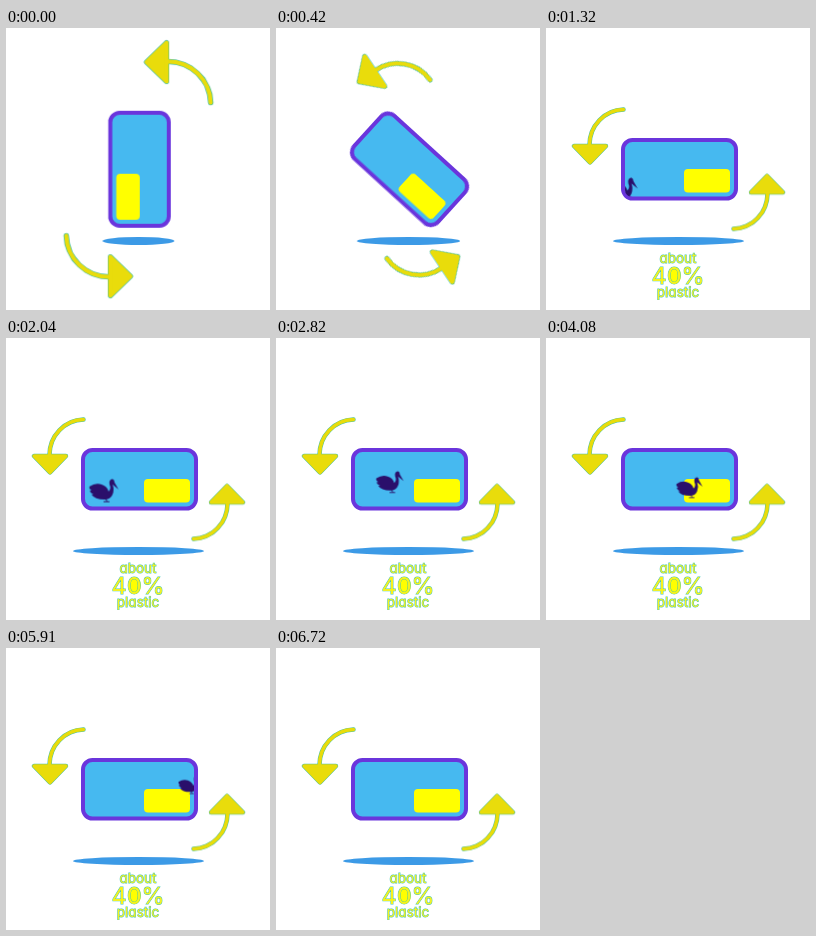
These frames come from a looping animation (264x282 px, 8000 ms). An HTML page:

```html
<!DOCTYPE html>
<html lang="en">
<head>
<meta charset="utf-8">
<title>Turning card</title>
<style>
  html, body { margin: 0; width: 100%; height: 100%; overflow: hidden; background: #fff; }
  svg { display: block; width: 264px; height: 282px; }

  .card, .shadow, .arrows, .bird, .label { animation: 8s linear infinite; }

  .card { transform-origin: 133.5px 141.3px; animation-name: turn; }
  .shadow { transform-origin: 132.5px 213px; animation-name: widen; }
  .arrows { transform-origin: 132.5px 141.2px; animation-name: orbit; }
  .bird { animation-name: stroll; }
  .label { animation-name: appear; }

  /* One step every 30 ms: card 150-660 ms, arrows 150-870 ms */
  @keyframes turn {
    0% { transform: rotate(90deg); }
    1.875% { transform: rotate(90deg); animation-timing-function: steps(17); }
    8.25%, 100% { transform: rotate(0deg); }
  }
  @keyframes widen {
    0% { transform: scaleX(.55); }
    1.875% { transform: scaleX(.55); animation-timing-function: steps(17); }
    8.25%, 100% { transform: scaleX(1); }
  }
  @keyframes orbit {
    0% { transform: rotate(90deg) scale(1.21); }
    1.875% { transform: rotate(90deg) scale(1.21); animation-timing-function: steps(24); }
    10.875%, 100% { transform: rotate(0deg) scale(1); }
  }
  @keyframes appear {
    0%, 12% { opacity: 0; }
    15.75%, 100% { opacity: 1; }
  }
  @keyframes stroll {
    0%, 10.875% { transform: translate(61px, 166px) scale(1.04); }
    12% { transform: translate(64.5px, 165px) scale(1.04); }
    22.5% { transform: translate(91.5px, 157px) scale(1.01); }
    25.5% { transform: translate(97.5px, 152.5px) scale(1); }
    32.25% { transform: translate(109px, 146px) scale(.97); }
    35.25% { transform: translate(113.5px, 144px) scale(.94); }
    42.375% { transform: translate(127px, 145px) scale(.92); }
    51% { transform: translate(143px, 149.5px) scale(.9); }
    56.625% { transform: translate(153px, 150.5px) scale(.87); }
    62.625% { transform: translate(163px, 147.5px) scale(.84); }
    65.625% { transform: translate(168.5px, 144.5px) scale(.8); }
    72.75% { transform: translate(181.5px, 138px) scale(.78); }
    84%, 100% { transform: translate(199.5px, 127px) scale(.75); }
  }

  .label text {
    font: 13.5px Inter, "Open Sans", sans-serif;
    font-feature-settings: "cv11";
    text-anchor: middle;
    fill: #f6f21c;
    stroke: #3fc4b4;
    stroke-width: .9px;
    paint-order: stroke;
  }
  .label .big { font-size: 23.5px; }
</style>
</head>
<body>
<svg viewBox="0 0 264 282">
  <defs>
    <clipPath id="inside"><rect x="79" y="114" width="109" height="55" rx="7"/></clipPath>
    <path id="arc" d="M43.5 117A35 35.5 0 0 1 77.5 81.5" fill="none" stroke-linecap="round"/>
    <path id="head" d="M28 118H60L44 134.5Z" stroke-linejoin="round"/>
    <g id="arrow">
      <g stroke="#43bfa6">
        <use href="#arc" stroke-width="4.4"/>
        <use href="#head" stroke-width="4.4"/>
      </g>
      <g stroke="#e9dc0b" fill="#e9dc0b">
        <use href="#arc" stroke-width="3.4"/>
        <use href="#head" stroke-width="3.4"/>
      </g>
    </g>
  </defs>

  <ellipse class="shadow" cx="132.5" cy="213" rx="65.5" ry="4" fill="#3c9ae6"/>

  <g class="card">
    <rect x="77" y="112" width="113" height="58.5" rx="9.5" fill="#46b9f0" stroke="#6a35dc" stroke-width="4"/>
    <rect x="138" y="141" width="46" height="23.5" rx="4" fill="#ff0"/>
  </g>

  <g clip-path="url(#inside)">
    <g class="bird" fill="#2a0f6b">
      <path d="M-14-4Q-8-8-2-6Q4-4 5 1Q8-2 6-6Q5-11 9-11.5Q11-11 11-8L15-1 9-6Q11-1 9 4Q7 9 1 9Q-9 9-12 4L-10 4Q-14 2-13.5 0L-12 0Q-15-2-14-4Z"/>
      <path d="M2 8L3.5 11M0 11.2H6" fill="none" stroke="#2a0f6b"/>
    </g>
  </g>

  <g class="arrows">
    <use href="#arrow"/>
    <use href="#arrow" transform="rotate(180 132.5 141.2)"/>
  </g>

  <g class="label">
    <ellipse cx="129.5" cy="247.5" rx="5.5" ry="8" fill="#ff0"/>
    <text x="132" y="234.5">about</text>
    <text x="132" y="256" class="big">40%</text>
    <text x="132" y="269.3">plastic</text>
  </g>
</svg>
</body>
</html>
```
